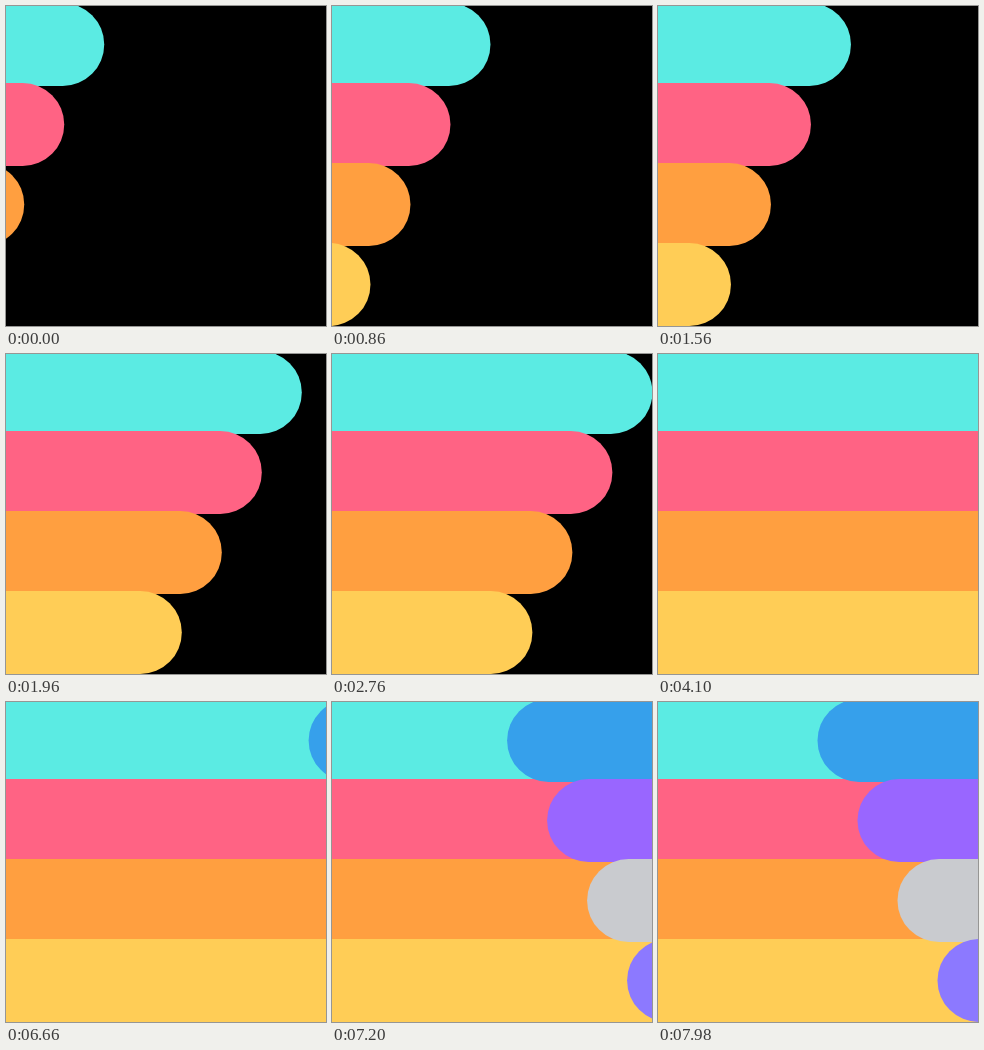
Write an HTML page with a canvas that moves like this. It is 320x320 px and loops after 8 s.

```html
<!DOCTYPE html>
<html>
<head>
<meta charset="utf-8">
<title>Bars</title>
<style>
html, body { margin: 0; width: 100%; height: 100%; overflow: hidden; background: #000; }
canvas { display: block; width: 320px; height: 320px; }
</style>
</head>
<body>
<canvas id="stage" width="320" height="320"></canvas>
<script>
const ctx = document.getElementById('stage').getContext('2d');
const LOOP = 8000, STEP = 161, LAG = 40, THICK = 83, TAU = 248;
const fromLeft = ['#5bebe3', '#ff6384', '#ff9f40', '#ffcd56'];
const fromRight = ['#36a0eb', '#9966ff', '#c9cbcf', '#8c79ff'];
const leftStarts = [-235, 1505, 3190];
const rightStart = 6633;

// Exponential ease-out of one step
const ease = ms => ms <= 0 ? 0 : 1 - Math.exp(-ms / TAU);

// Distance covered by consecutive steps, each taking over from the last
function travel(t) {
  const i = leftStarts.findLastIndex(s => t >= s);
  return STEP * (i + ease(t - leftStarts[i]));
}

// Round-ended bars; dir 1 grows rightwards, -1 leftwards
function bars(colors, tip, dir) {
  colors.forEach((color, i) => {
    const x = tip - dir * (i * LAG + THICK / 2);
    const y = 38.5 + i * 80;
    ctx.strokeStyle = color;
    ctx.beginPath();
    ctx.moveTo(x - dir * 700, y);
    ctx.lineTo(x, y);
    ctx.stroke();
  });
}

function draw(now) {
  const t = now % LOOP;
  ctx.fillStyle = '#000';
  ctx.fillRect(0, 0, 320, 320);
  ctx.lineWidth = THICK;
  ctx.lineCap = 'round';
  bars(fromLeft, t < 4100 ? travel(t) - 0.6 : 500, 1);
  if (t > rightStart) bars(fromRight, 319.8 - STEP * ease(t - rightStart), -1);
}

const begin = performance.now();
function tick() {
  draw(performance.now() - begin);
  requestAnimationFrame(tick);
}
tick();
</script>
</body>
</html>
```
